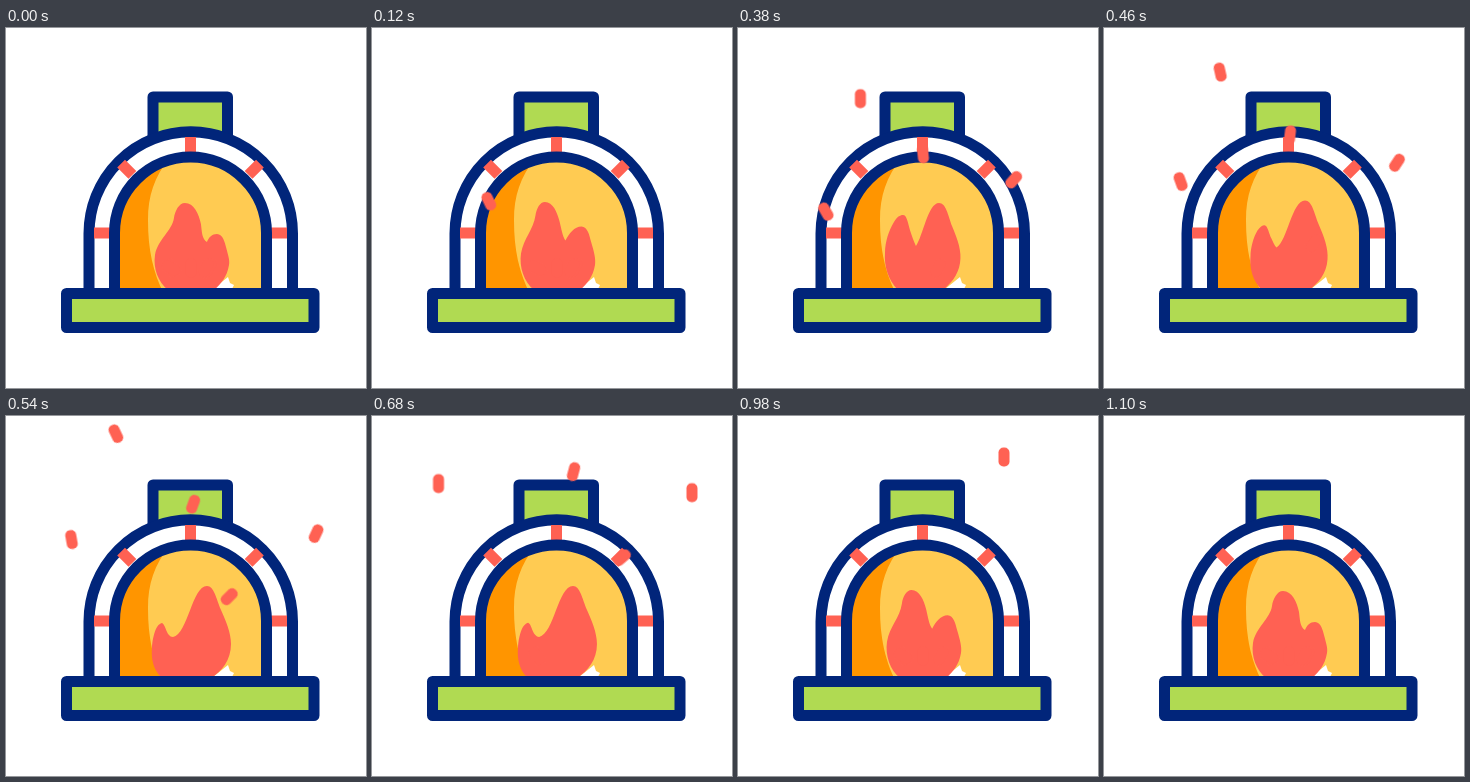
Animation, 360 px wide and 360 px high, one loop 1120 ms. Source, as an HTML page:

```html
<!DOCTYPE html>
<html lang="en">
<head>
<meta charset="utf-8">
<title>Brick oven</title>
<style>
  html, body { margin: 0; width: 100%; height: 100%; overflow: hidden; background: #fff; }
  svg { display: block; width: 100%; height: 100%; }

  .line { stroke: #01257a; stroke-width: 11; stroke-linejoin: round; }
  .green { fill: #b0da52; }
  .brick { stroke: #ff6153; stroke-width: 11; }
  .flame, .ember { fill: #ff6153; animation: 1120ms linear infinite; }
  .flame { animation-name: flicker; }

  @keyframes flicker {
    0%, 98.2%, 100% { d: path("M162 262 C152 254 147 240 149 227 C152 211 166 203 168 190 C169 183 173 175 179 175 C188 175 193 186 195 196 C196 204 196 211 201 214 C203 209 206 206 211 206 C217 206 219 215 220 219 C222 227 224 232 223 237 C221 249 215 256 208 262Z"); }
    21.43%, 75% { d: path("M162 262 C152 254 147 238 149 224 C151 210 157 200 159 185 C160 178 163 173 167 173 C174 173 177 182 180 190 C183 198 185 205 186 211 C191 202 199 191 208 191 C214 191 216 200 218 208 C222 220 224 230 223 237 C221 249 215 256 208 262Z"); }
    33.93%, 67.9% { d: path("M160 262 C150 252 146 238 147 225 C147 214 151 202 156 194 C159 189 162 187 165 187 C169 187 170 195 172 202 C174 208 176 214 178 218 C185 208 190 175 201 175 C208 175 210 187 214 198 C220 212 224 224 222 235 C220 248 212 256 205 262Z"); }
    48.21%, 60.71% { d: path("M156 262 C147 254 145 242 146 232 C146 226 148 216 151 211 C153 208 155 207 156 207 C159 208 160 216 163 219 C164 220 165 221 167 221 C182 218 186 170 201 170 C208 170 210 182 215 194 C220 205 225 217 225 228 C225 244 216 255 205 262Z"); }
  }

  /* Each ember waits inside the flame, flies out, then jumps back. */
  @keyframes ember1 {
    0%, 1.8%, 50.91%, 100% { transform: translate(165px, 240px) rotate(-40deg); }
    9% { transform: translate(122px, 185px) rotate(-35deg); }
    15% { transform: translate(105px, 146px) rotate(-5deg); }
    21.43% { transform: translate(109px, 115px) rotate(15deg); }
    33.93% { transform: translate(122.5px, 71px) rotate(0deg); }
    48.21% { transform: translate(110px, 18px) rotate(-25deg); }
    50.9% { transform: translate(107px, 11px) rotate(-28deg); }
  }
  @keyframes ember2 {
    0%, 13.4%, 73.21%, 100% { transform: translate(165px, 240px) rotate(-60deg); }
    21.43% { transform: translate(117px, 231px) rotate(-32deg); }
    33.93% { transform: translate(88px, 184px) rotate(-30deg); }
    48.21% { transform: translate(65.5px, 124px) rotate(-10deg); }
    60.71% { transform: translate(66.5px, 68px) rotate(0deg); }
    73.2% { transform: translate(69px, 14px) rotate(0deg); }
  }
  @keyframes ember3 {
    0%, 11%, 73.21%, 100% { transform: translate(203px, 240px) rotate(30deg); }
    21.43% { transform: translate(256px, 190px) rotate(25deg); }
    33.93% { transform: translate(275.5px, 152px) rotate(42deg); }
    48.21% { transform: translate(310px, 118px) rotate(25deg); }
    60.71% { transform: translate(320px, 77px) rotate(0deg); }
    73.2% { transform: translate(318px, 34px) rotate(0deg); }
  }
  @keyframes ember4 {
    0%, 20%, 77.61%, 100% { transform: translate(185px, 240px) rotate(0deg); }
    33.93% { transform: translate(185px, 126px) rotate(-6deg); }
    48.21% { transform: translate(187px, 88.5px) rotate(20deg); }
    60.71% { transform: translate(201.5px, 56px) rotate(15deg); }
    75% { transform: translate(210px, 17px) rotate(0deg); }
    77.6% { transform: translate(211px, 11px) rotate(0deg); }
  }
  @keyframes ember5 {
    0%, 36%, 93.01%, 100% { transform: translate(200px, 240px) rotate(30deg); }
    48.21% { transform: translate(223px, 181px) rotate(45deg); }
    60.71% { transform: translate(250px, 142px) rotate(50deg); }
    75% { transform: translate(266px, 90px) rotate(0deg); }
    93% { transform: translate(266px, 20px) rotate(0deg); }
  }
</style>
</head>
<body>
<svg viewBox="0 0 360 360">
  <defs>
    <clipPath id="mouth"><path d="M108.5 266V205a76 76 0 0 1 152 0V266Z"/></clipPath>
  </defs>

  <rect class="line green" x="147" y="69" width="74.5" height="50"/>
  <path class="line" fill="#fff" d="M83 266V205.5a101.75 101.75 0 0 1 203.5 0V266Z"/>

  <path class="brick" d="M104 205H88M126.4 146.9L115.1 135.6M184.5 124V109M242.6 146.9L253.9 135.6M265 205H281"/>

  <g clip-path="url(#mouth)">
    <rect x="100" y="120" width="170" height="146" fill="#ffcb52"/>
    <path fill="#ff9500" d="M100 120H172C150 143 142 165 142 192C142 222 147 244 158 266H100Z"/>
    <path fill="#fff" d="M207 261L222 249L224 255L228 257L226 261Z"/>
  </g>
  <path class="flame" d="M162 262 C152 254 147 240 149 227 C152 211 166 203 168 190 C169 183 173 175 179 175 C188 175 193 186 195 196 C196 204 196 211 201 214 C203 209 206 206 211 206 C217 206 219 215 220 219 C222 227 224 232 223 237 C221 249 215 256 208 262Z"/>
  <path class="line" fill="none" d="M108.5 266V205a76 76 0 0 1 152 0V266"/>
  <rect class="line green" x="60.5" y="265.5" width="247.5" height="34"/>

  <rect class="ember" style="animation-name:ember1" x="-5.5" y="-9.5" width="11" height="19" rx="5"/>
  <rect class="ember" style="animation-name:ember2" x="-5.5" y="-9.5" width="11" height="19" rx="5"/>
  <rect class="ember" style="animation-name:ember3" x="-5.5" y="-9.5" width="11" height="19" rx="5"/>
  <rect class="ember" style="animation-name:ember4" x="-5.5" y="-9.5" width="11" height="19" rx="5"/>
  <rect class="ember" style="animation-name:ember5" x="-5.5" y="-9.5" width="11" height="19" rx="5"/>
</svg>
</body>
</html>
```
